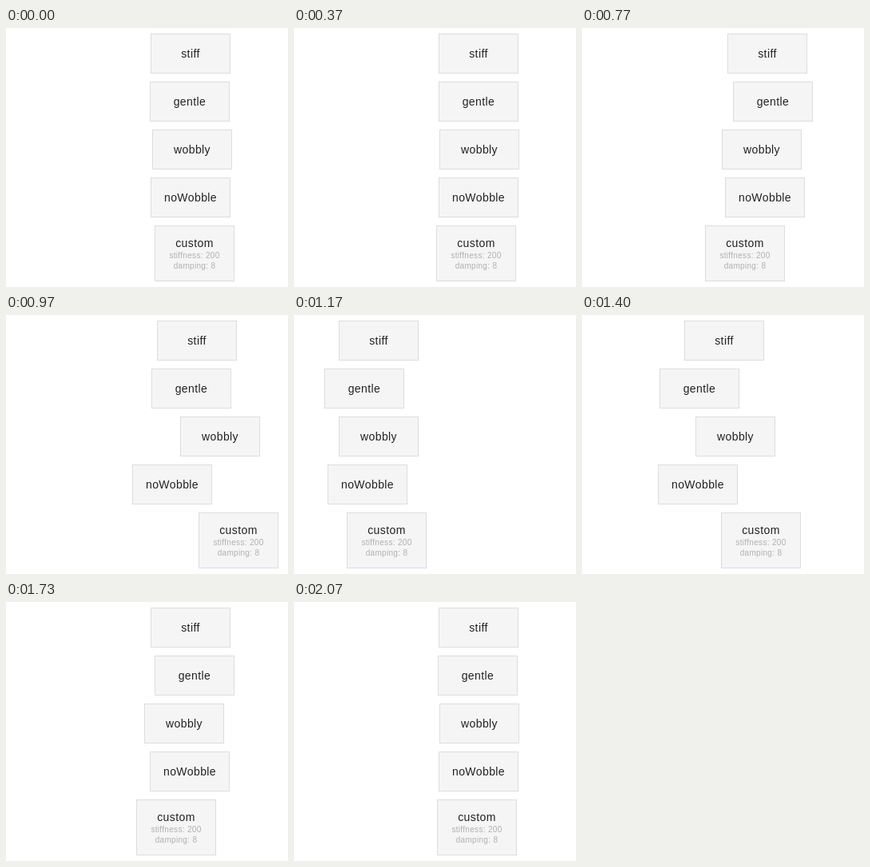
Animation, 353 px wide and 324 px high, one loop 2.11 s. Source, as an HTML page:

```html
<!DOCTYPE html>
<html lang="en">
<head>
<meta charset="utf-8">
<title>Spring presets</title>
<style>
  html, body {
    margin: 0;
    width: 100%;
    height: 100%;
    overflow: hidden;
    background: #fff;
  }
  body {
    position: relative;
    font-family: "Liberation Sans", Arial, sans-serif;
  }
  .box {
    position: absolute;
    left: 0;
    box-sizing: border-box;
    width: 100px;
    height: 50px;
    border: 1px solid #ddd;
    background: #f5f5f5;
    color: #222;
    font-size: 14px;
    line-height: 48px;
    letter-spacing: .42px;
    text-align: center;
    white-space: nowrap;
  }
  .custom {
    height: 70px;
    padding-top: 13px;
    line-height: 17px;
  }
  small {
    display: block;
    color: #b0b0b0;
    font-size: 10px;
    line-height: 13px;
    letter-spacing: .32px;
  }
</style>
</head>
<body>
<div class="box" style="top:7px" data-k="210" data-c="20">stiff</div>
<div class="box" style="top:67px" data-k="120" data-c="14">gentle</div>
<div class="box" style="top:127px" data-k="180" data-c="12">wobbly</div>
<div class="box" style="top:187px" data-k="170" data-c="26">noWobble</div>
<div class="box custom" style="top:247px" data-k="200" data-c="8">custom<small>stiffness: 200</small><small>damping: 8</small></div>
<script>
  const LOOP = 2110, STEP = 100 / 3, LAST = 62;
  const FROM = 3, TO = 181;

  // Playhead of the springs in seconds at given loop times: up, back to zero, up again
  const playhead = [
    [0, .78], [230, 1.005], [370, .87], [770, .476], [1170, .064],
    [1240, 0], [1400, .132], [1730, .527], [2070, .855]
  ];

  const boxes = [...document.querySelectorAll('.box')].map(el => ({
    el, k: +el.dataset.k, c: +el.dataset.c
  }));

  function springTime(ms) {
    const i = Math.max(1, playhead.findIndex(p => p[0] >= ms));
    const [t0, s0] = playhead[i - 1], [t1, s1] = playhead[i];
    return s0 + (s1 - s0) * (ms - t0) / (t1 - t0);
  }

  // Remaining distance of a unit-mass spring released at rest
  function remaining(k, c, t) {
    const g = c / 2, d = k - g * g;
    const w = Math.sqrt(Math.max(d, 1e-6));
    return Math.exp(-g * t) * (Math.cos(w * t) + g / w * Math.sin(w * t));
  }

  function draw() {
    const now = performance.now() % LOOP;
    const step = Math.min(LAST, Math.floor((now + 4) / STEP));
    const t = springTime(Math.min(2070, step * STEP));
    for (const { el, k, c } of boxes) {
      const x = TO - (TO - FROM) * remaining(k, c, t);
      el.style.transform = `translateX(${Math.round(x)}px)`;
    }
    requestAnimationFrame(draw);
  }
  draw();
</script>
</body>
</html>
```
